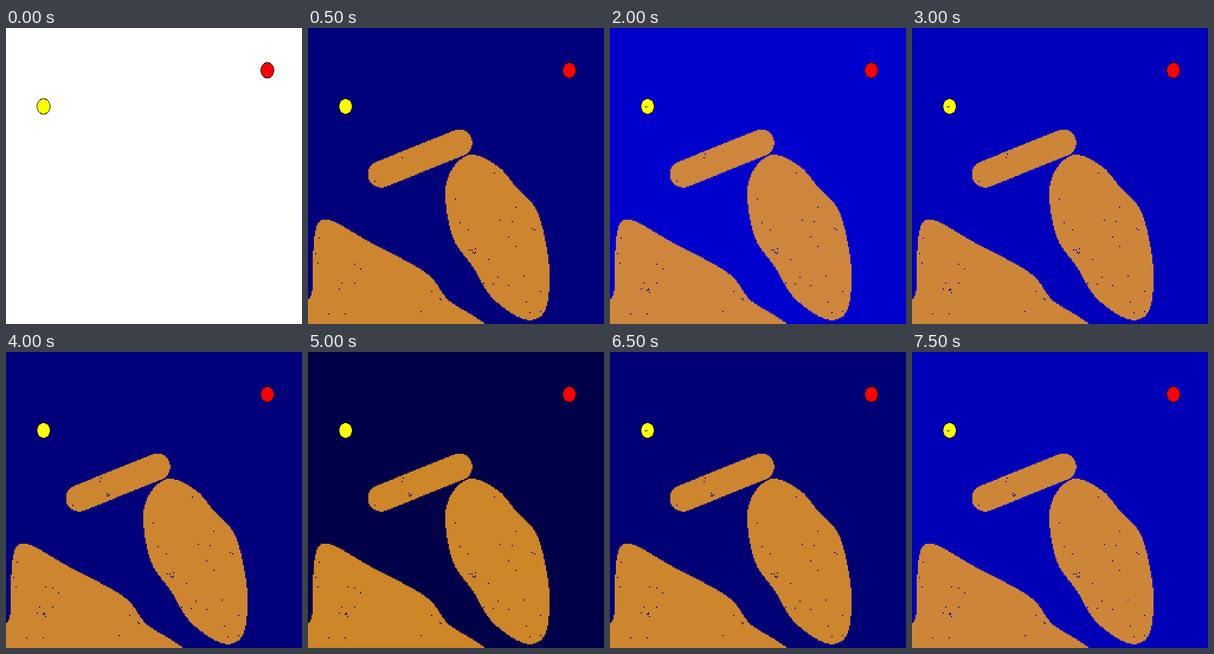
These frames come from a looping animation (500x500 px, 8000 ms). An HTML page with a canvas:

```html
<!DOCTYPE html>
<html>
<head>
<meta charset="utf-8">
<style>
html, body { margin: 0; width: 100%; height: 100%; overflow: hidden; background: #fff; }
canvas { display: block; }
</style>
</head>
<body>
<canvas id="stage" width="500" height="500"></canvas>
<script>
const ctx = document.getElementById('stage').getContext('2d');
const SIZE = 500, CELL = 2, STEP = 500, STEPS = 16;

let seed = 7;
function random() {
  seed = (seed * 16807) % 2147483647;
  return seed / 2147483647;
}

function rect(color, x, y, w, h) {
  ctx.fillStyle = color;
  ctx.fillRect(x, y, w, h);
}

// Closed Catmull-Rom curve through a few key points
function blob(...points) {
  const path = new Path2D(), n = points.length;
  const at = i => points[(i + n) % n];
  path.moveTo(...at(0));
  for (let i = 0; i < n; i++) {
    const [a, b, c, d] = [at(i - 1), at(i), at(i + 1), at(i + 2)];
    path.bezierCurveTo(
      b[0] + (c[0] - a[0]) / 6, b[1] + (c[1] - a[1]) / 6,
      c[0] - (d[0] - b[0]) / 6, c[1] - (d[1] - b[1]) / 6, ...c);
  }
  return path;
}

const hill = blob([-6, 470], [8, 445], [12, 352], [33, 325], [110, 366],
  [198, 414], [235, 459], [290, 515], [-6, 515]);
const island = blob([277, 215], [322, 236], [352, 271], [385, 308], [402, 370],
  [407, 430], [398, 480], [365, 491], [312, 455], [280, 404], [246, 354],
  [233, 281], [245, 238]);
const bar = new Path2D('M124 247L255 194');

function isLand(x, y) {
  ctx.lineCap = 'round';
  ctx.lineWidth = 45;
  if (ctx.isPointInStroke(bar, x, y)) return true;
  ctx.lineWidth = 2;
  return [hill, island].some(p => ctx.isPointInPath(p, x, y) || ctx.isPointInStroke(p, x, y));
}

const land = [];
for (let y = 0; y < SIZE; y += CELL)
  for (let x = 0; x < SIZE; x += CELL)
    if (isLand(x + 1, y + 1)) land.push({ x, y });

// Places where the ground gets eaten, each from a given step on
const sites = [
  { x: 277, y: 377, from: 1, count: 6 },
  { x: 64, y: 443, from: 3, count: 5 },
  { x: 161, y: 211, from: 4, count: 1 },
  { x: 169, y: 241, from: 7, count: 5 },
  { x: 65, y: 397, from: 7, count: 2 }
];
const snap = v => Math.round(v / CELL) * CELL;
const holes = Array.from({ length: 38 }, () => ({
  ...land[Math.floor(random() * land.length)], from: 1
}));
for (const { x, y, from, count } of sites)
  for (let k = 0; k < count; k++)
    holes.push({
      x: snap(x + (random() - .5) * 2 * count),
      y: snap(y + (random() - .5) * 1.5 * count),
      from
    });

// Ellipse with hard pixel edges
function ellipse(color, cx, cy, rx, ry) {
  for (let y = Math.ceil(cy - ry); y < cy + ry; y++) {
    const half = Math.round(rx * Math.sqrt(1 - ((y - cy) / ry) ** 2) - .5);
    rect(color, cx - half, y, 2 * half + 1, 1);
  }
}

function disc(color, x, y) {
  ellipse('#000', x, y, 11.5, 13.5);
  ellipse(color, x, y, 10.5, 12.5);
}

function drawBug(x, y) {
  rect('#000', x - 3, y, 1, 2);
  rect('#000', x - 2, y + 1, 3, 1);
  rect('#000', x + 1, y, 1, 1);
}

function drawWorld(step) {
  const blue = Math.round(138 + 68 * Math.cos((step - 4.5) * 2 * Math.PI / 12.15));
  rect(`rgb(0,0,${blue})`, 0, 0, SIZE, SIZE);
  const mesh = `rgb(130,95,${Math.round(40 + blue * .6)})`;
  for (const { x, y } of land) {
    rect('rgb(230,147,25)', x, y, CELL, CELL);
    rect(mesh, x + 1, y + 1, 1, 1);
  }
  const pit = `rgb(0,0,${Math.max(blue, 130)})`;
  for (const { x, y, from } of holes)
    if (step >= from) rect(pit, x, y, CELL, CELL);
}

function draw(step) {
  rect('#fff', 0, 0, SIZE, SIZE);
  if (step > 0) drawWorld(step);
  disc('#ff0', 63, 132);
  disc('#f00', 441, 71);
  if ((step >= 4 && step <= 6) || step >= 11) drawBug(62, 132);
}

let shown = -1;
function tick() {
  const step = Math.floor(performance.now() / STEP) % STEPS;
  if (step !== shown) draw(shown = step);
  requestAnimationFrame(tick);
}
tick();
</script>
</body>
</html>
```
